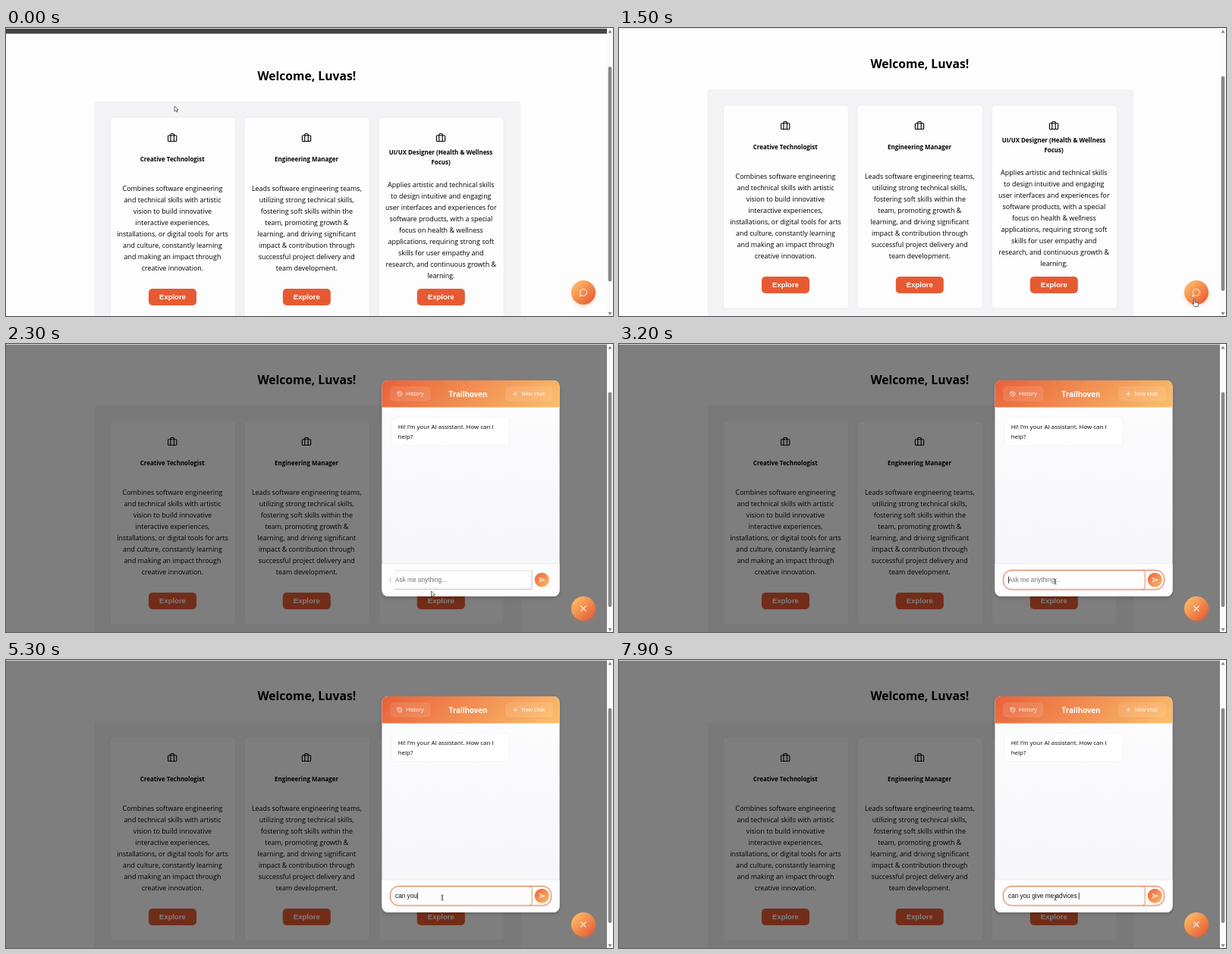
Write an HTML page that moves like this. It is 800x380 px and loops after 8 s.

```html
<!DOCTYPE html>
<html lang="en">
<head>
<meta charset="utf-8">
<title>Career chat assistant</title>
<style>
  html, body { margin: 0; width: 100%; height: 100%; overflow: hidden; background: #fdfdfd; }
  svg { display: block; width: 800px; height: 380px; font-family: "Open Sans", "Noto Sans", sans-serif; }
  .mid { text-anchor: middle; }
  .bold { font-weight: 700; }
  .arial { font-family: "Liberation Sans", Arial, sans-serif; }
  .line { fill: none; stroke-linecap: round; stroke-linejoin: round; }
</style>
</head>
<body>
<svg id="stage" viewBox="0 0 800 380">
  <defs>
    <linearGradient id="warm" x1="0" y1="0" x2="1" y2="1">
      <stop offset="0" stop-color="#ea6138"/><stop offset="1" stop-color="#fcbd68"/>
    </linearGradient>
    <linearGradient id="glow" x1="0" y1="0" x2="1" y2="1">
      <stop offset="0.1" stop-color="#fcbd68"/><stop offset="0.9" stop-color="#e85c34"/>
    </linearGradient>
    <linearGradient id="head" gradientUnits="userSpaceOnUse" x1="545" y1="-2" x2="680" y2="133">
      <stop offset="0" stop-color="#e96039"/><stop offset="1" stop-color="#fbbf6c"/>
    </linearGradient>
    <linearGradient id="body" x1="0" y1="0" x2="0" y2="1">
      <stop offset="0" stop-color="#fdfdfe"/><stop offset="1" stop-color="#f5f5f9"/>
    </linearGradient>
    <filter id="soft" x="-30%" y="-30%" width="160%" height="160%"><feGaussianBlur stdDeviation="2.5"/></filter>
    <clipPath id="round"><rect x="495.5" y="48" width="234" height="285" rx="8"/></clipPath>
  </defs>
  <rect width="800" height="380" fill="#fdfdfd"/>
  <g id="page"></g>
  <rect width="792" height="0.8" fill="#e3e3e3"/>
  <rect id="shade" y="0.8" width="792" height="380" opacity="0"/>
  <g id="bar">
    <rect x="792" width="8" height="380" fill="#fafafa"/>
    <path d="M793.5 6.5h5l-2.5-4zM793.5 375h5l-2.5 4z" fill="#8a8a8a"/>
    <rect id="thumb" x="793.7" y="51" width="4.6" height="283.5" rx="2.3" fill="#888"/>
  </g>
  <g id="panel"></g>
  <g id="fab"></g>
  <g id="mouse"></g>
</svg>
<script>
const $ = id => document.getElementById(id);
const LOOP = 8000, STEP = 100;

const cards = [
  { x: 219.5, title: ["Creative Technologist"], titleY: 175.8, textY: 215.3, text: [
    "Combines software engineering", "and technical skills with artistic", "vision to build innovative",
    "interactive experiences,", "installations, or digital tools for arts", "and culture, constantly learning",
    "and making an impact through", "creative innovation."] },
  { x: 396.3, title: ["Engineering Manager"], titleY: 175.8, textY: 215.3, text: [
    "Leads software engineering teams,", "utilizing strong technical skills,", "fostering soft skills within the",
    "team, promoting growth &amp;", "learning, and driving significant", "impact &amp; contribution through",
    "successful project delivery and", "team development."] },
  { x: 573.3, title: ["UI/UX Designer (Health &amp; Wellness", "Focus)"], titleY: 166.6, textY: 210, text: [
    "Applies artistic and technical skills", "to design intuitive and engaging", "user interfaces and experiences for",
    "software products, with a special", "focus on health &amp; wellness", "applications, requiring strong soft",
    "skills for user empathy and", "research, and continuous growth &amp;", "learning."] }
];

const text = (x, y, size, str, cls = "", fill = "#000") =>
  `<text x="${x}" y="${y}" font-size="${size}" class="${cls}" fill="${fill}">${str}</text>`;
const lines = (x, y, gap, size, list, cls) =>
  list.map((s, i) => text(x, y + i * gap, size, s, cls)).join("");
// 24-unit line icon centred on (x, y)
const icon = (x, y, scale, d, color, width = 2) =>
  `<path class="line" d="${d}" stroke="${color}" stroke-width="${width}"
    transform="translate(${x} ${y}) scale(${scale}) translate(-12 -12)"/>`;

const CASE = "M4 7h16a2 2 0 0 1 2 2v10a2 2 0 0 1-2 2H4a2 2 0 0 1-2-2V9a2 2 0 0 1 2-2zM16 21V5a2 2 0 0 0-2-2h-4a2 2 0 0 0-2 2v16";
const BUBBLE = "M7.9 20A9 9 0 1 0 4 16.1L2 22Z";
const CROSS = "M18 6 6 18M6 6l12 12";
const CLOCK = "M3 12a9 9 0 1 0 9-9 9.75 9.75 0 0 0-6.74 2.74L3 8M3 3v5h5M12 7v5l4 2";
const PLUS = "M5 12h14M12 5v14";
const PLANE = "M3 4l19 8-19 8 4-8zM7 12h15";

const card = c => `
  <rect x="${c.x - 82}" y="118" width="165" height="268" rx="4" fill="#fdfdfd" stroke="#e9eaec" stroke-width="0.7"/>
  ${icon(c.x - 0.3, 144.5, 0.56, CASE, "#000")}
  ${lines(c.x - 0.3, c.titleY, 13.4, 7.95, c.title, "mid bold")}
  ${lines(c.x, c.textY, 15, 8.93, c.text, "mid")}
  <rect x="${c.x - 31.5}" y="344" width="63" height="22" rx="5" fill="#e65a33"/>
  ${text(c.x, 358.3, 9.5, "Explore", "mid bold arial", "#fff")}`;

$("page").innerHTML = `
  <rect y="0.8" width="792" height="6.7" fill="#434343"/>
  ${text(396.3, 69, 15.7, "Welcome, Luvas!", "mid bold")}
  <rect x="116.5" y="97" width="562" height="320" rx="4" fill="#f3f3f5"/>
  ${cards.map(card).join("")}`;

$("panel").innerHTML = `
  <rect x="495.5" y="50" width="234" height="285" rx="8" opacity="0.2" filter="url(#soft)"/>
  <rect x="495.5" y="48" width="234" height="285" rx="8" fill="url(#body)"/>
  <rect x="495.8" y="48.3" width="233.4" height="284.4" rx="8" fill="none" stroke="#fff" stroke-opacity="0.45" stroke-width="0.6"/>
  <g id="content">
    <g clip-path="url(#round)">
      <rect x="495" y="48" width="235" height="35.5" fill="url(#head)"/>
      <rect x="495" y="290" width="235" height="44" fill="#fdfdfd"/>
      <path d="M495 290h235" stroke="#e8e8ec" stroke-width="0.7"/>
    </g>
    <g fill="#fff" fill-opacity="0.1" stroke="#fff" stroke-opacity="0.16" stroke-width="0.5">
      <rect x="506.5" y="56.5" width="52.5" height="18.5" rx="5"/>
      <rect x="658.5" y="56.5" width="62" height="18.5" rx="5"/>
    </g>
    ${icon(519, 65.8, 0.33, CLOCK, "#fff")}
    ${text(527, 68.3, 7.05, "History", "", "#fff")}
    ${text(609, 69.8, 9.7, "Trailhoven", "mid bold", "#fff")}
    ${icon(671.3, 65.8, 0.36, PLUS, "#fff")}
    ${text(679.3, 68.3, 7.1, "New chat", "", "#fff")}
    <rect x="508" y="96.5" width="155.5" height="37.5" rx="6" fill="#fff" stroke="#efeff3" stroke-width="0.6"/>
    ${lines(516.7, 112, 12.5, 7.95, ["Hi! I’m your AI assistant. How can I", "help?"], "")}
    <g id="idle" class="line" stroke-width="0.8">
      <path d="M513 299h180" stroke="#dcdcdc"/><path d="M693 299v24.5H513" stroke="#b5b5b5"/>
      <path d="M506.5 308v7" stroke="#bbb"/>
    </g>
    <g id="focus" class="line" stroke="#e6734c">
      <rect x="506.5" y="298.5" width="212" height="25.5" rx="11" stroke-opacity="0.22" stroke-width="2.5"/>
      <rect x="506.5" y="298.5" width="212" height="25.5" rx="11" stroke-width="0.8"/>
      <path d="M690 298.5q3.2 0 3.2 3v19.5q0 3-3.2 3" stroke-width="0.8"/>
    </g>
    <circle cx="706.3" cy="311.3" r="9.5" fill="url(#warm)"/>
    ${icon(706.3, 311.3, 0.36, PLANE, "#fff")}
    <text id="typed" class="arial" x="513" y="314.2" font-size="8.27"></text>
    <rect id="caret" y="306.8" width="0.8" height="9" fill="#111"/>
  </g>`;

$("fab").innerHTML = `
  <circle cx="761" cy="351" r="16" fill="#e8743c" opacity="0.25" filter="url(#soft)"/>
  <circle cx="761" cy="349" r="16" fill="url(#glow)"/>
  <g id="talk">${icon(761, 349, 0.5, BUBBLE, "#fff", 1.8)}</g>
  <g id="close">${icon(761, 349, 0.52, CROSS, "#fff")}</g>`;

$("mouse").innerHTML = `
  <path id="arrow" d="M0 0v7l1.7-1.5 1.2 2.5 1.1-.5-1.1-2.4h2.2z" fill="#fff" stroke="#333" stroke-width="0.7"/>
  <path id="hand" d="M0 .8q.9-1.3 1.7 0v3.4l3.5.8q1 .4.8 1.5l-.6 3.6H1.3L-1.8 6.5q.2-1.2 1.8 0z" fill="#fff" stroke="#222" stroke-width="0.7"/>
  <path id="beam" class="line" d="M-1.4-3.5q1.4 0 1.4.8v5.4q0 .8-1.4.8M1.4-3.5q-1.4 0-1.4.8v5.4q0 .8 1.4.8" stroke="#333" stroke-width="0.7"/>`;

// [time, x, y]
const path = [[0, 222, 103], [100, 222, 103], [500, 302, 138], [1400, 757.5, 357.5],
              [1900, 757.5, 357.5], [2300, 560.5, 326], [2700, 575, 313.5], [LOOP, 575, 313.5]];
// [time, characters typed]
const keys = [[4000, 0], [4200, 1], [5200, 7], [5400, 7.5], [7700, 24]];
const phrase = "can you give me advices ".replace(/ /g, "\u00a0");

const clamp = v => Math.max(0, Math.min(1, v));
const span = (t, a, b) => clamp((t - a) / (b - a));
const smooth = p => p * p * (3 - 2 * p);
function track(table, t, col, ease = p => p) {
  const i = table.findIndex(row => row[0] > t);
  if (i === 0) return table[0][col];
  if (i < 0) return table[table.length - 1][col];
  const a = table[i - 1], b = table[i];
  return a[col] + (b[col] - a[col]) * ease(span(t, a[0], b[0]));
}
const show = (id, on) => $(id).setAttribute("visibility", on ? "visible" : "hidden");
const move = (id, x, y) => $(id).setAttribute("transform", `translate(${x} ${y})`);
const fade = (id, v) => $(id).setAttribute("opacity", v);

function draw(t) {
  const scroll = smooth(span(t, 0, 400));
  move("page", 0, -16 * scroll);
  move("thumb", 0, 12.5 * scroll);

  const open = span(t, 1700, 1900);
  fade("shade", span(t, 1680, 1880) * 0.5);
  fade("panel", open);
  fade("content", open);
  move("panel", 0, 14 * (1 - open));
  show("talk", t < 1700);
  show("close", t >= 1700);

  const focused = t >= 2900;
  const count = Math.floor(track(keys, t, 1) + 0.001);
  show("idle", !focused);
  show("focus", focused);
  const typed = $("typed");
  typed.textContent = count ? phrase.slice(0, count) : "Ask me anything...";
  typed.setAttribute("fill", count ? "#111" : "#757575");
  const blink = count > 0 || Math.floor((t - 2900) / 500) % 2 === 0;
  show("caret", focused && blink);
  $("caret").setAttribute("x", 513 + (count ? typed.getComputedTextLength() : 0));

  const x = track(path, t, 1, smooth), y = track(path, t, 2, smooth);
  const onFab = Math.hypot(x - 761, y - 349) < 16;
  const onInput = t > 2300 && y < 324;
  move("mouse", x, y);
  show("hand", onFab);
  show("beam", onInput);
  show("arrow", !onFab && !onInput);
}

const start = performance.now();
function tick() {
  const t = (performance.now() - start) % LOOP;
  draw(Math.floor(t / STEP) * STEP);
  requestAnimationFrame(tick);
}
tick();
</script>
</body>
</html>
```
